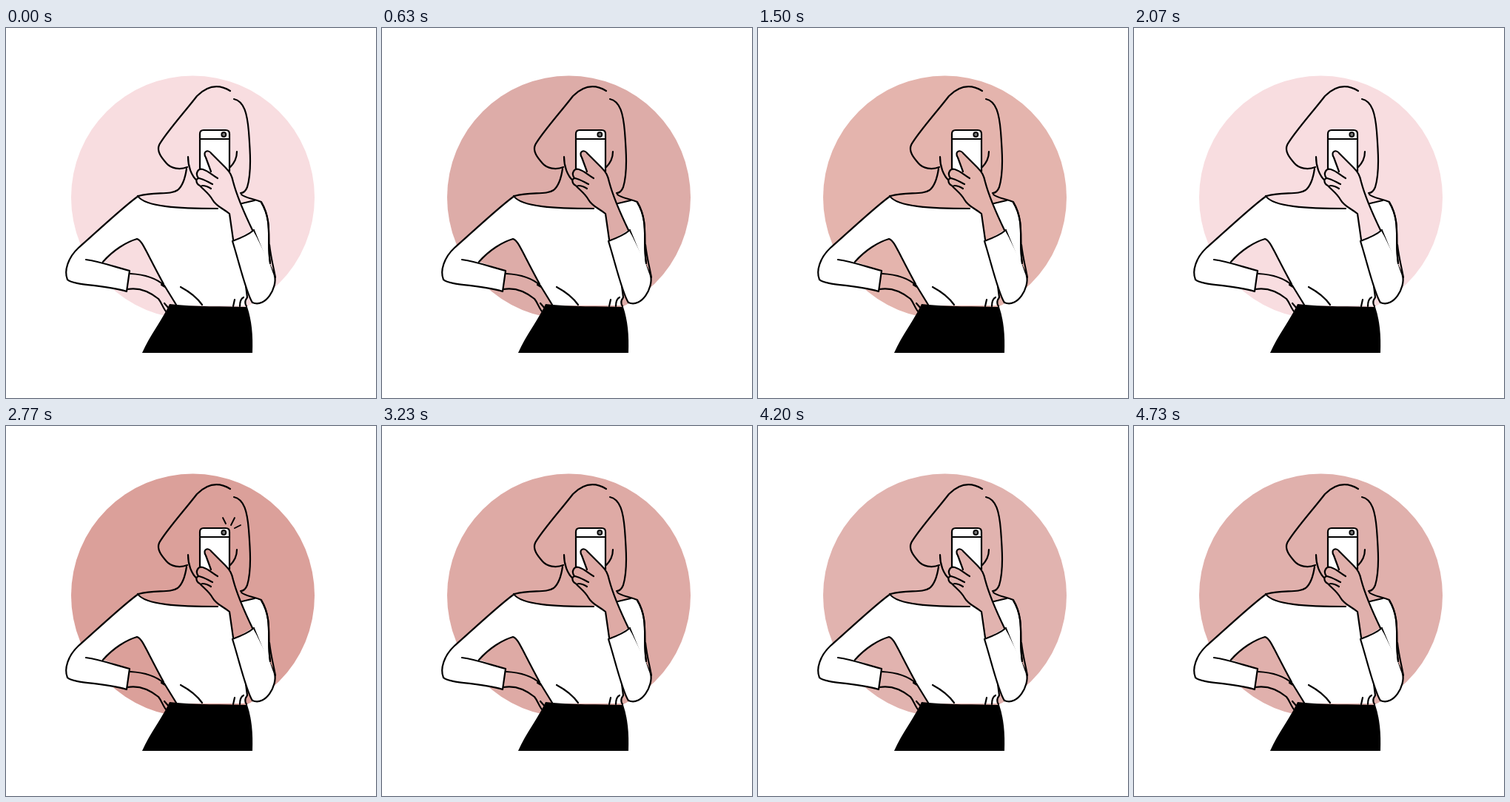
These frames come from a looping animation (500 by 500 pixels, 4760 ms). An HTML page:

```html
<!DOCTYPE html>
<html lang="en">
<head>
<meta charset="utf-8">
<title>Mirror selfie</title>
<style>
html, body { margin: 0; width: 100%; height: 100%; overflow: hidden; background: #fff; }
svg { display: block; width: 100vw; height: 100vh; }
.ink { fill: none; stroke: #000; stroke-width: 2.2; stroke-linecap: round; stroke-linejoin: round; }
.cloth { fill: #fff; }
.skin { fill: currentColor; }
</style>
</head>
<body>
<svg id="scene" viewBox="0 0 500 500" color="#f8dde0">
  <circle class="skin" cx="252.5" cy="229" r="164.5"/>

  <!-- blouse -->
  <path class="cloth" d="M179 227C160 240 120 278 98 297C84 310 78 328 83 340C91 348 135 347 163 356L167 328L131 316C145 300 163 289 177 285C184 287 187 298 214 348L230 375H322L326 364L325 348L354 340L356 318C353 290 360 262 345 235L335 233L284 244C240 244 195 245 179 227Z"/>
  <path class="ink" d="M179 227C160 240 120 278 98 297C84 310 78 328 83 340C91 348 135 347 163 356L167 328C150 324 130 316 108 313M131 316C145 300 163 289 177 285C184 287 187 298 213 346"/>
  <path class="ink" d="M178 227C188 242 235 244 286 244M319 237L336 233"/>
  <path class="ink" d="M236 350C249 357 258 364 265 374M307 376L309 367M316 376C316 371 317 366 321 364M324 348L326 364C323 368 322 372 325 376"/>

  <!-- hand on hip -->
  <path class="ink" d="M168 332C186 333 202 337 214 348L230 374M210 347L215 350M164 353C181 350 195 357 206 366C211 372 212 379 217 384M214 372L221 380"/>

  <!-- hair, face and neck -->
  <path class="ink" d="M303 85C285 74 270 80 258 92C241 114 215 143 207 158C203 167 211 176 217 183C223 190 235 192 245 188"/>
  <path class="ink" d="M308 96C322 99 326 116 328 140C330 166 332 195 326 215C324 220 321 223 317 223"/>
  <path class="ink" d="M246 174C246 186 250 200 259 207M312 167C312 175 308 183 303 188"/>
  <path class="ink" d="M244 190C242 204 238 214 232 219C222 226 202 221 179 227M318 225C324 230 332 230 345 235C361 262 352 288 357 318"/>

  <!-- phone -->
  <path class="cloth" d="M262 198V143Q262 138 267 138H297Q302 138 302 143V200Z"/>
  <path class="ink" d="M262 192V143Q262 138 267 138H297Q302 138 302 143V194M262 150H302"/>
  <circle cx="294.3" cy="144" r="3" fill="#777" stroke="#000" stroke-width="1.8"/>

  <!-- raised hand -->
  <path class="skin" d="M270 175C265 167 273 163 278 170L296 188C303 195 305 199 307 208C312 227 320 246 333 273L307 289L302 251C292 243 284 241 279 232C274 223 267 219 262 213C257 211 256 203 260 203C255 196 260 189 266 191L277 194Z"/>
  <path class="ink" d="M277 194L270 175C265 167 273 163 278 170L296 188C303 195 305 199 307 208C312 227 320 246 333 273M307 286L302 251C292 243 284 241 279 232C274 223 267 219 262 213C256 210 256 203 261 203C266 204 271 207 279 211M260 203C255 196 260 189 266 191C273 193 279 199 286 203M265 213C270 213 274 215 277 217"/>

  <!-- raised sleeve -->
  <path class="cloth ink" style="fill:#fff" d="M306 288C317 284 328 279 335 273L363 335C367 350 351 379 333 371C325 360 314 313 306 288Z"/>
  <path class="cloth" d="M336 277L356 318L362 335L350 325Z"/>
  <path class="cloth" d="M336 273L344 238C358 262 351 288 356 318L362 337Z"/>
  <path class="ink" d="M345 236C361 262 352 288 357 318M356 293C358 311 362 325 364 337"/>

  <!-- skirt -->
  <path d="M221 373C255 377 295 376 326 377C332 395 334 415 333 439H184C195 414 211 395 221 373Z"/>

  <path id="spark" class="ink" style="stroke-width:1.9" d="M293 124L297 132M309 124L304 134M317 134L309 138"/>
</svg>
<script>
const LOOP = 4760;
const scene = document.getElementById("scene");
const spark = document.getElementById("spark");

// time in ms, then red, green, blue
const tints = [
  [0, 248, 221, 224],
  [130, 248, 221, 224],
  [630, 221, 172, 168],
  [1500, 228, 180, 173],
  [1700, 228, 180, 173],
  [2000, 248, 221, 224],
  [2130, 248, 221, 224],
  [2700, 219, 160, 154],
  [2850, 219, 160, 154],
  [3670, 226, 181, 177],
  [LOOP, 224, 176, 172]
];

function tintAt(t) {
  const i = tints.findIndex(k => k[0] > t);
  const a = tints[i - 1], b = tints[i];
  const p = (t - a[0]) / (b[0] - a[0]);
  const mix = n => Math.round(a[n] + (b[n] - a[n]) * p);
  return `rgb(${mix(1)},${mix(2)},${mix(3)})`;
}

function draw(t) {
  scene.style.color = tintAt(t);
  spark.style.visibility = t >= 2600 && t < 2930 ? "visible" : "hidden";
}

function tick(now) {
  draw(now % LOOP);
  requestAnimationFrame(tick);
}
draw(0);
requestAnimationFrame(tick);
</script>
</body>
</html>
```
